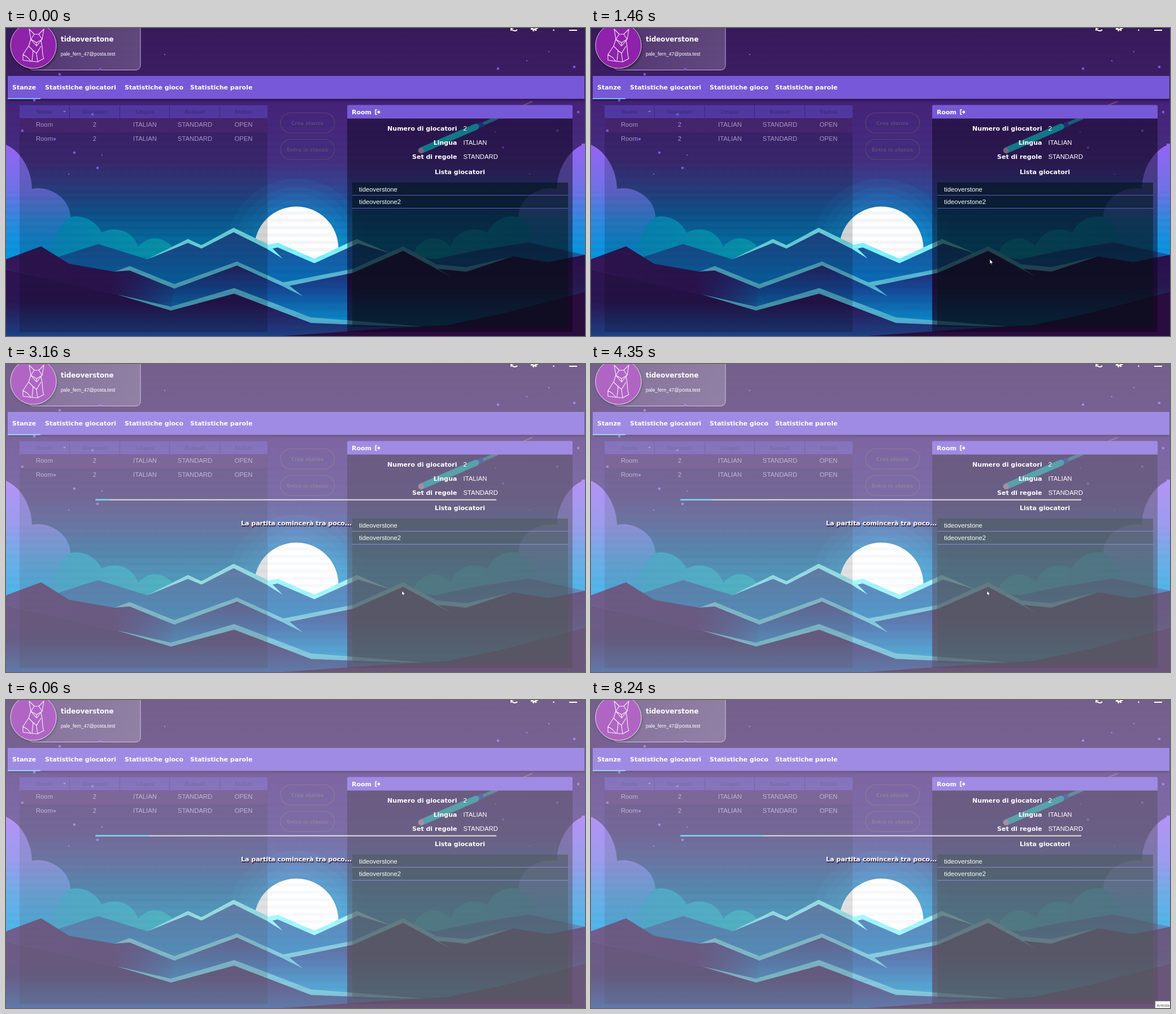
An HTML page that plays this animation: 1025x546 px, repeating every 8.3 s.

```html
<!DOCTYPE html>
<html lang="it">
<head>
<meta charset="utf-8">
<title>Stanze</title>
<style>
  html, body { margin: 0; width: 100%; height: 100%; overflow: hidden; background: #3a1b5e; }
  svg { display: block; width: 1025px; height: 546px; }
  text { font: 11.3px "Liberation Sans", Arial, sans-serif; fill: #fff; white-space: pre; }
  .b { font: bold 11px "DejaVu Sans", Verdana, sans-serif; }
  .user { font-size: 11.9px; }
  .mail { font-size: 8.63px; }
  .mid { text-anchor: middle; }
  .end { text-anchor: end; }
  .cell { fill: #a596c4; text-anchor: middle; }
  .head { font-size: 8.6px; fill: #3d2f80; text-anchor: middle; }
  .btn { font-size: 8.6px; fill: #5a4a72; text-anchor: middle; }
  .msg { text-shadow: 1px 2px 1px #35102c; }
  .tip { font-size: 7px; fill: #555; }
</style>
</head>
<body>
<svg viewBox="0 0 1025 546">
  <defs>
    <linearGradient id="sky" x1="0" y1="0" x2="0" y2="546" gradientUnits="userSpaceOnUse">
      <stop offset="0" stop-color="#391a5a"/>
      <stop offset=".14" stop-color="#3c1d62"/>
      <stop offset=".25" stop-color="#46237a"/>
      <stop offset=".43" stop-color="#452e80"/>
      <stop offset=".52" stop-color="#324692"/>
      <stop offset=".6" stop-color="#1260a4"/>
      <stop offset=".7" stop-color="#0484c0"/>
      <stop offset="1" stop-color="#0a90cc"/>
    </linearGradient>
    <linearGradient id="cloud" x1="0" y1="208" x2="0" y2="405" gradientUnits="userSpaceOnUse">
      <stop offset="0" stop-color="#9463f2"/>
      <stop offset=".4" stop-color="#6f72e6"/>
      <stop offset=".7" stop-color="#2a8cde"/>
      <stop offset="1" stop-color="#0098e0"/>
    </linearGradient>
    <linearGradient id="teal" x1="80" y1="0" x2="300" y2="0" gradientUnits="userSpaceOnUse">
      <stop offset="0" stop-color="#0898d2"/>
      <stop offset="1" stop-color="#06b0c8"/>
    </linearGradient>
    <linearGradient id="far" x1="0" y1="356" x2="0" y2="455" gradientUnits="userSpaceOnUse">
      <stop offset="0" stop-color="#254a94"/>
      <stop offset="1" stop-color="#0670b8"/>
    </linearGradient>
    <linearGradient id="near" x1="0" y1="415" x2="0" y2="525" gradientUnits="userSpaceOnUse">
      <stop offset="0" stop-color="#2b2064"/>
      <stop offset=".45" stop-color="#154a98"/>
      <stop offset="1" stop-color="#0890cc"/>
    </linearGradient>
    <linearGradient id="right" x1="0" y1="400" x2="0" y2="532" gradientUnits="userSpaceOnUse">
      <stop offset="0" stop-color="#2c0f48"/>
      <stop offset=".45" stop-color="#281850"/>
      <stop offset="1" stop-color="#0c5484"/>
    </linearGradient>
    <linearGradient id="left" x1="0" x2="310" y1="0" y2="0" gradientUnits="userSpaceOnUse">
      <stop offset="0" stop-color="#35175a"/>
      <stop offset=".6" stop-color="#32165a"/>
      <stop offset="1" stop-color="#32165a" stop-opacity="0"/>
    </linearGradient>
    <linearGradient id="front" x1="0" y1="428" x2="0" y2="546" gradientUnits="userSpaceOnUse">
      <stop offset="0" stop-color="#301350"/>
      <stop offset=".5" stop-color="#2a1652"/>
      <stop offset="1" stop-color="#1c4084"/>
    </linearGradient>
    <linearGradient id="card">
      <stop offset="0" stop-color="#fff" stop-opacity=".12"/>
      <stop offset="1" stop-color="#fff" stop-opacity=".2"/>
    </linearGradient>
    <pattern id="bands" width="1025" height="13" patternUnits="userSpaceOnUse">
      <rect width="1025" height="6" fill="#001040" opacity=".04"/>
    </pattern>
    <filter id="soft" x="-20%" y="-20%" width="140%" height="140%">
      <feDropShadow dx="1" dy="2" stdDeviation="2" flood-color="#000" flood-opacity=".6"/>
    </filter>
  </defs>

  <!-- sky -->
  <rect width="1025" height="546" fill="url(#sky)"/>
  <rect width="1025" height="546" fill="url(#bands)"/>
  <g id="halo" fill="#22a0e0" fill-opacity=".09"></g>
  <circle cx="514" cy="391" r="74.500" fill="#fff"/>
  <g>
    <path d="M735 217L932 130" stroke="#7a4a72" stroke-width="2"/>
    <path d="M735 217L870 159" stroke="#34a8c0" stroke-width="6"/>
    <path d="M735 217L845 170" stroke="#2458c4" stroke-width="9"/>
    <path d="M735 217L832 175" stroke="#10e0e8" stroke-width="11" stroke-linecap="round"/>
    <circle cx="735" cy="217" r="4.5" fill="#ffa4d0"/>
  </g>
  <g id="clouds">
    <g fill="url(#teal)">
      <circle cx="124" cy="384" r="50"/><circle cx="192" cy="401" r="44"/><circle cx="264" cy="410" r="37"/>
      <path d="M60 370H172L240 392L300 396V425H60Z"/>
    </g>
    <path d="M0 207C24 217 45 248 46 285C80 279 114 304 114 335C88 352 82 385 75 425H0Z" fill="url(#cloud)"/>
  </g>
  <use href="#clouds" transform="matrix(-1 0 0 1 1021 0)"/>
  <rect x="1019" y="205" width="6" height="210" fill="url(#cloud)"/>

  <!-- mountains -->
  <path d="M60 420L95 405L163 383L250 410L322 378L346 389L403 358L463 388L482 383L546 412L621 377L680 400L760 410L830 395L925 380L1025 402V546H60Z" fill="url(#far)"/>
  <path d="M250 410L322 374L346 385L403 354L465 384L482 381L546 409L621 374L682 400L623 382L546 417L481 389L472 391L490 409L461 391L403 362L346 391L322 381Z" fill="#7df4ff"/>
  <path d="M0 440L192 432L219 425L298 458L409 418L490 454L614 431L703 391L790 440L1025 440V546H0Z" fill="url(#near)"/>
  <path d="M604 436L703 391L760 422L815 428L898 405L960 415L1025 402V546H604Z" fill="url(#right)"/>
  <path d="M192 432L219 422L298 454L409 414L491 451L614 427L703 387L762 419L815 424L896 405L815 432L765 427L788 441L703 395L614 434L502 457L526 476L488 457L409 421L298 462L219 430Z" fill="#55b6d0"/>
  <path d="M0 410L62 387L112 418L192 432L219 430L298 462L292 494L195 472L0 428Z" fill="url(#left)"/>
  <path d="M195 472L292 494L404 461L540 513L640 521L745 530L640 527L540 523L404 471L292 501Z" fill="#50aecb"/>
  <path d="M0 428L195 472L292 501L404 471L540 523L640 527L745 531L640 546H0Z" fill="url(#front)"/>
  <path d="M1025 468L880 506L780 527L700 531L490 546H1025Z" fill="#2a0d3e"/>
  <rect y="290" width="1025" height="256" fill="url(#bands)"/>

  <!-- profile -->
  <rect x="40" y="-20" width="198" height="94.500" rx="8" fill="url(#card)" stroke="#bcaed0"/>
  <circle cx="48.500" cy="31" r="40.500" fill="#8e24aa" stroke="#d8c4e2" filter="url(#soft)"/>
  <path d="M41 2L44 20L54 32L64 20L67 2L58 11H50ZM41 2L50 11L44 20L54 26L64 20L58 11M54 26V32M44 20L40 32L30 47V57L44 59L56 60L67 54C63 46 66 37 62 23M40 32L48 40L46 59M62 32L54 45L56 60M48 40L54 45M30 47L38 52L44 59" fill="none" stroke="#f4e8f8" stroke-width="1.100" stroke-linejoin="round"/>
  <text class="b user" x="97" y="24">tideoverstone</text>
  <text class="mail" x="97" y="49">pale_fern_47@posta.test</text>
  <g fill="none" stroke="#fff" stroke-width="2">
    <path d="M894.500 0A6 5.500 0 0 0 905 3M906.500 -1A6 6 0 0 0 902 -6"/>
    <path d="M894 5V0H899" stroke-width="1.600"/>
    <circle cx="935" cy="-1" r="3.800" stroke-width="3"/>
    <circle cx="935" cy="-1" r="6" stroke-dasharray="2.400 2.310"/>
    <path d="M969.500 -6V0M969.500 2.500V5M997 4H1011"/>
  </g>

  <!-- tabs -->
  <rect x="3" y="85" width="1021" height="40.500" fill="#7759d8" filter="url(#soft)"/>
  <rect x="3" y="124.500" width="58" height="1.500" fill="#6fe6fa"/>
  <text class="b" x="11" y="109">Stanze</text>
  <text class="b" x="69" y="109">Statistiche giocatori</text>
  <text class="b" x="210" y="109">Statistiche gioco</text>
  <text class="b" x="326" y="109">Statistiche parole</text>

  <!-- rooms -->
  <rect x="24" y="137" width="439" height="402" fill="#000" opacity=".17"/>
  <rect x="24" y="137" width="439" height="23.500" fill="#6048c4" opacity=".62"/>
  <rect x="24" y="160.500" width="439" height="25" fill="#683078" opacity=".25"/>
  <path d="M112.500 137V160M201.500 137V160M289.500 137V160M378.500 137V160M24 160.500H463" stroke="#33206c" opacity=".7"/>
  <path d="M101 147H106L103.500 149.500Z" fill="#9583c0"/>
  <g id="table"></g>
  <g id="stars" fill="#7d57d6"></g>
  <g fill="none" stroke="#57486f" stroke-width="1.200">
    <rect x="486" y="150.500" width="95.500" height="35.500" rx="17.700"/>
    <rect x="486" y="197.500" width="95.500" height="35.500" rx="17.700"/>
  </g>
  <text class="b btn" x="533.500" y="171.500">Crea stanza</text>
  <text class="b btn" x="533.500" y="218.500">Entra in stanza</text>

  <!-- room details -->
  <rect x="604" y="160" width="399" height="379" fill="#0c0014" opacity=".46"/>
  <path d="M604 160.500V139Q604 136.500 606.500 136.500H1000.500Q1003 136.500 1003 139V160.500Z" fill="#7759d8"/>
  <text class="b" x="612" y="152.500">Room</text>
  <path d="M657 145H654V153H657M656 149H661" fill="none" stroke="#fff" stroke-width="1.500"/>
  <path d="M659 145.500L663 149L659 152.500Z" fill="#fff"/>
  <text class="b end" x="798.500" y="182">Numero di giocatori</text>
  <text x="809.500" y="182">2</text>
  <text class="b end" x="798.500" y="206.500">Lingua</text>
  <text x="809.500" y="206.500">ITALIAN</text>
  <text class="b end" x="798.500" y="231.500">Set di regole</text>
  <text x="809.500" y="231.500">STANDARD</text>
  <text class="b mid" x="803.500" y="258.500">Lista giocatori</text>
  <rect x="613" y="274" width="382" height="256" fill="#001414" opacity=".42"/>
  <rect x="613" y="274" width="382" height="45" fill="#00101c" opacity=".25"/>
  <path d="M613 296.500H995M613 319.500H995" stroke="#6c52c4"/>
  <text x="625" y="289.500">tideoverstone</text>
  <text x="625" y="312">tideoverstone2</text>

  <!-- countdown -->
  <g id="wait" visibility="hidden">
    <rect width="1025" height="546" fill="#fff" opacity=".3"/>
    <rect x="158.500" y="239.700" width="709.500" height="2" fill="#e2e2de"/>
    <rect id="bar" x="158.500" y="239.700" width="0" height="2" fill="#5fe2f8"/>
    <text class="b msg" x="416" y="286">La partita comincerà tra poco...</text>
  </g>
  <g id="tip" visibility="hidden">
    <rect x="999" y="534" width="27" height="13" fill="#fff" stroke="#bbb" stroke-width=".5"/>
    <text class="tip" x="1001.500" y="543.500">Arresta</text>
  </g>
  <path id="cursor" visibility="hidden" d="M0 0V8L1.800 6.400L3 9.200L4.300 8.600L3.100 6H5.700Z" fill="#fff" stroke="#111" stroke-width=".5"/>
</svg>
<script>
  const LOOP = 8300, STEP = 77.5, MOVE = 530, WAIT = 2010;
  const $ = id => document.getElementById(id);

  function add(parent, tag, attrs, text) {
    const el = document.createElementNS("http://www.w3.org/2000/svg", tag);
    for (const k in attrs) el.setAttribute(k, attrs[k]);
    if (text) el.textContent = text;
    parent.append(el);
  }

  const stars = [[167, 73], [95, 82], [50, 128], [29, 182], [153, 153], [86, 197],
    [121, 221], [162, 248], [871, 72], [1006, 69], [1013, 149], [976, 182], [880, 212]];
  const dust = [[281, 47], [111, 259], [170, 225], [866, 184], [927, 259], [961, 42], [922, 58]];
  stars.forEach(([cx, cy]) => add($("stars"), "circle", { cx, cy, r: 2.3 }));
  dust.forEach(([cx, cy]) => add($("stars"), "circle", { cx, cy, r: 1.2 }));
  [85, 97, 109, 124].forEach(r => add($("halo"), "circle", { cx: 514, cy: 391, r }));

  const columns = [
    [68, "Nome", "Room"], [157, "Giocatori", "2"], [246, "Lingua", "ITALIAN"],
    [334.5, "Ruleset", "STANDARD"], [420.5, "Status", "OPEN"]
  ];
  for (const [x, title, value] of columns) {
    add($("table"), "text", { class: "b head", x, y: 152 }, title);
    for (const y of [174.5, 200]) add($("table"), "text", { class: "cell", x, y }, value);
  }

  // time, x, y
  const path = [
    [530, 1014, 538], [900, 850, 478], [1300, 711, 415], [1460, 706, 410],
    [2010, 706, 410], [2400, 701, 402], [4550, 701, 402],
    [5360, 886, 528], [5700, 1024, 548]
  ];

  function pointAt(t) {
    const i = path.findIndex(p => p[0] > t);
    if (i < 1) return null;
    const [t0, x0, y0] = path[i - 1], [t1, x1, y1] = path[i];
    const k = (t - t0) / (t1 - t0);
    return [x0 + (x1 - x0) * k, y0 + (y1 - y0) * k];
  }

  const show = (el, on) => el.setAttribute("visibility", on ? "visible" : "hidden");

  function draw(now) {
    const t = now % LOOP;
    const tick = MOVE + Math.floor((t - MOVE) / STEP) * STEP;
    const p = pointAt(tick);
    show($("cursor"), p);
    if (p) $("cursor").setAttribute("transform", `translate(${p})`);
    show($("wait"), t >= WAIT);
    $("bar").setAttribute("width", Math.max(0, (tick - WAIT) * 0.0237));
    show($("tip"), t >= 6600);
    requestAnimationFrame(draw);
  }
  requestAnimationFrame(draw);
</script>
</body>
</html>
```
